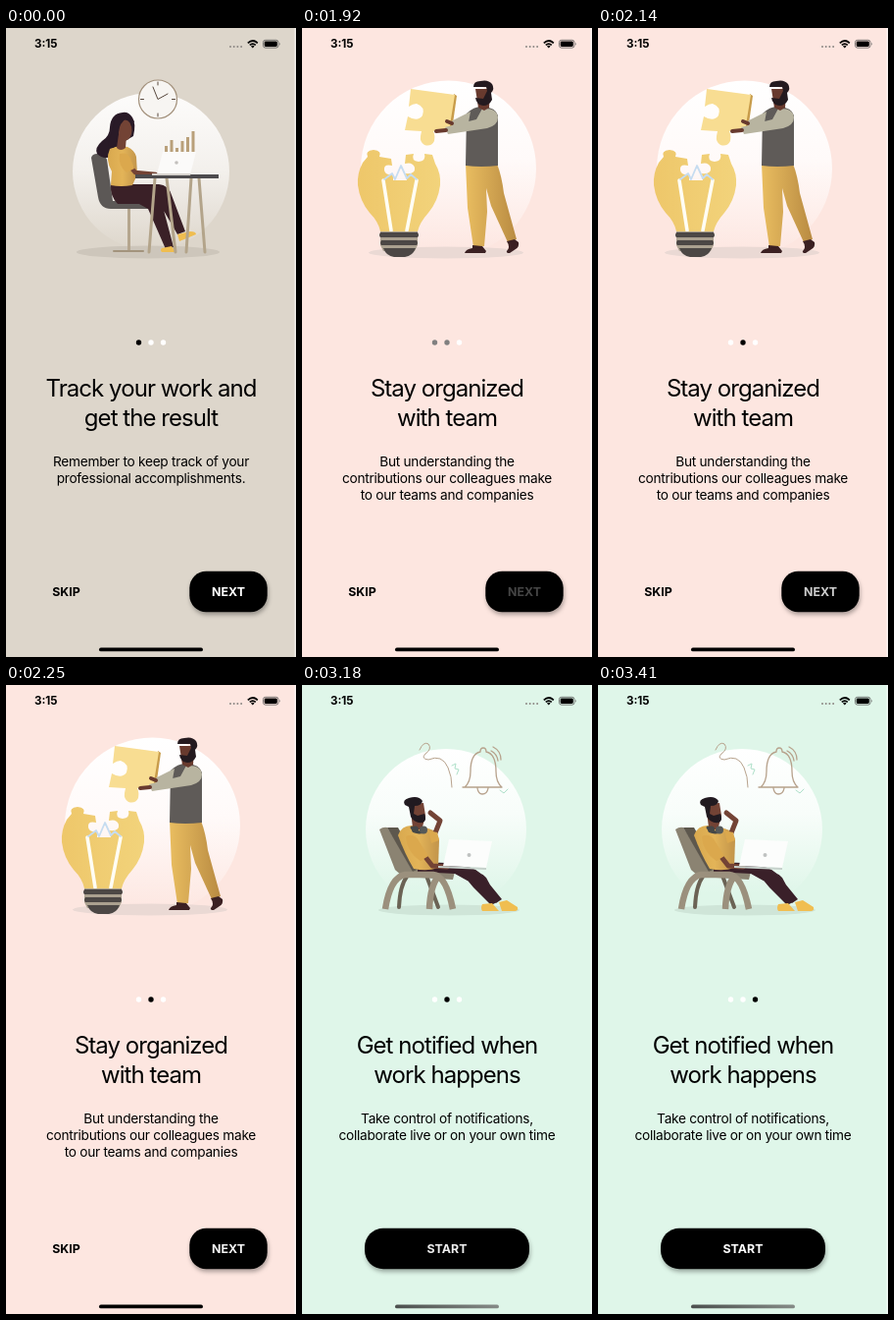
Animation, 296 px wide and 640 px high, one loop 3.45 s. Source, as an HTML page:

```html
<!DOCTYPE html>
<html lang="en">
<head>
<meta charset="utf-8">
<title>Onboarding</title>
<style>
  html, body { margin: 0; width: 100%; height: 100%; overflow: hidden; }
  svg { display: block; width: 100vw; height: 100vh; }
  text { font-family: Inter, "Liberation Sans", sans-serif; font-optical-sizing: none; text-anchor: middle; }
  .title { font-size: 24px; letter-spacing: -.95px; }
  .body { font-size: 13.7px; letter-spacing: -.27px; }
  .btn { font-size: 12.4px; font-weight: 700; }
  .time { font-size: 11.6px; font-weight: 700; }
  .shadow { filter: drop-shadow(1px 3px 2px rgba(0, 0, 0, .3)); }
  .line { fill: none; stroke-linecap: round; stroke-linejoin: round; }
</style>
</head>
<body>
<svg viewBox="0 0 296 640" preserveAspectRatio="none">
  <defs>
    <linearGradient id="disc1" x2="0" y2="1">
      <stop stop-color="#fdfcfb"/><stop offset=".5" stop-color="#f3f0ec"/><stop offset="1" stop-color="#ddd6cb"/>
    </linearGradient>
    <linearGradient id="disc2" x2="0" y2="1">
      <stop stop-color="#fff"/><stop offset=".45" stop-color="#fffaf9"/><stop offset="1" stop-color="#fde6e0"/>
    </linearGradient>
    <linearGradient id="disc3" x2="0" y2="1">
      <stop stop-color="#fff"/><stop offset=".4" stop-color="#f8fdfa"/><stop offset=".9" stop-color="#dff6e9"/>
    </linearGradient>
    <linearGradient id="gold"><stop stop-color="#e9bd60"/><stop offset="1" stop-color="#b98b42"/></linearGradient>
    <linearGradient id="shirt"><stop stop-color="#d9a94f"/><stop offset=".5" stop-color="#e3b458"/><stop offset="1" stop-color="#c2944a"/></linearGradient>
    <linearGradient id="bulb"><stop stop-color="#eec76a"/><stop offset="1" stop-color="#f2d37b"/></linearGradient>
    <linearGradient id="bar"><stop stop-color="#4c504e"/><stop offset="1" stop-color="#858b87"/></linearGradient>
  </defs>

  <rect id="bg" width="296" height="640"/>
  <rect x="294.5" width="1.5" height="640" fill="#fff" opacity=".6"/>

  <g class="page" data-bg="#ddd6cb">
    <circle cx="148" cy="146" r="80" fill="url(#disc1)"/>
    <ellipse cx="145" cy="228" rx="73" ry="6.5" fill="#cdc6bb"/>
    <circle cx="155" cy="72.5" r="19.5" fill="#f7f5f2" stroke="#a3917c" stroke-width="1.2"/>
    <path class="line" stroke="#58483d" d="M150 60 155 72.500 165 67M155 55v3M155 87v3M137.500 72.500h3M169.500 72.500h3"/>
    <path fill="#b9a07a" d="M162 120h3v9h-3zM167.500 114h3v15h-3zM173 122h3v7h-3zM178.500 115h3v12h-3zM184 111h3v16h-3zM189.500 105h3v22h-3z"/>
    <!-- chair -->
    <path class="line" stroke="#b5a68e" stroke-width="3" d="M125.500 184v42"/>
    <path class="line" stroke="#a3947d" stroke-width="2" d="M110 227h30"/>
    <path fill="#5c5856" d="M87 132q1-4 6-4 8-1 10 6l6 42 43 1q3 5-2 7h-43q-11 0-13-12z"/>
    <!-- person -->
    <path fill="#3a2027" d="M107 159h49q10 1 13 11l14 37-8 3-18-31h-43q-8-8-7-20zM134 164q20-2 24 10l13 49-8 2-18-41-11-6z"/>
    <path fill="#efbd50" d="M159 224l10-2 4 6H159q-2-2 0-4zM175 210l13-3q6 0 6 3l-17 7z"/>
    <path fill="#291a27" d="M119 86q-12 1-13 15 0 9-8 14-8 7-5 13 6 6 14 3 10-5 11-14l12-7q3-13-1-19-4-6-10-5z"/>
    <path fill="url(#shirt)" d="M106 123q8-4 18-2 7 3 9 10l1 18-5 11q-12 2-22 0l1-14q-7-12-2-23z"/>
    <path class="line" stroke="#734335" stroke-width="4.500" d="M124 138l8 9 21 2"/>
    <path fill="#dba84d" d="M116 128q8-2 11 5l4 10-8 4q-9-7-7-19z"/>
    <path fill="#734335" d="M115 108l8 1-1 13q-5 4-9 0z"/>
    <ellipse cx="121.500" cy="104" rx="7" ry="10.500" fill="#734335"/>
    <path fill="#291a27" d="M128 100q-1-6-5-8-7 4-8 14l-5 16-6-3 8-28 12-2 7 6z"/>
    <!-- desk -->
    <path class="line" stroke="#b3a48a" stroke-width="3" d="M152 153l-6 75M164 153l9 75M189 153l-5 75M197 153l6 75"/>
    <path fill="#4d4b4e" d="M132 149h85v4h-85z"/>
    <path fill="#fbfaf9" d="M160 126h34l-6 23h-34z"/>
    <path fill="#d6d2cd" d="M149 148h40l-1 2h-39z"/>
    <circle cx="174" cy="137" r="1.800" fill="#c3c0bd"/>

    <text class="title"><tspan x="148" y="375">Track your work and</tspan><tspan x="148" y="405">get the result</tspan></text>
    <text class="body"><tspan x="148" y="446">Remember to keep track of your</tspan><tspan x="148" y="463">professional accomplishments.</tspan></text>
  </g>

  <g class="page" data-bg="#fde6e0">
    <circle cx="149.500" cy="143" r="89.500" fill="url(#disc2)"/>
    <ellipse cx="147" cy="228.500" rx="79" ry="6" fill="#ead9d4"/>
    <!-- bulb -->
    <path fill="url(#bulb)" d="M62 137l5-6q-3-6 6-7 9 1 6 7l12 2 1 7q-9-2-8 5 2 6 9 3v7h14l-1-7q10 1 9-6-2-6-10-4l1-9 8-1q-3 7 5 8 8-1 6-8l8 1 3 9q6 10 5 22-2 16-12 28-9 10-11 19H80q-2-10-11-19-10-12-12-28-1-12 5-23z"/>
    <path class="line" stroke="#fffdf4" stroke-width="3.600" d="M83 155l8 51M117 155l-10 51"/>
    <path class="line" stroke="#c6dcf0" stroke-width="1.800" d="M84 154l8-6 3 6 6-14 6 13 4-4 6 5"/>
    <path fill="#aaa08f" d="M80 207h38v14l-3 6H83l-3-6z"/>
    <path fill="#4c4745" d="M80 208h38q2 3 0 5H80q-2-2 0-5zM81 216h36q2 3 0 5H81q-2-2 0-5zM83 224h33q-3 8-11 9H94q-8-1-11-9z"/>
    <!-- puzzle piece -->
    <path fill="#c89c4b" d="M155 67l3 2-5 35-4 3z"/>
    <path fill="#f8dd92" d="M111 62l45 6-6 37-16 0q2 4 1 10-3 6-10 4-5-3-4-9l1-5-17-1 3-14q10 6 15-1 3-9-6-12-4 0-8 3z"/>
    <!-- person -->
    <path fill="url(#gold)" d="M167 138h32q5 13 7 30l13 47-9 3-17-37-5-18 1 24-3 35-11 1-6-40z"/>
    <path fill="#3b2022" d="M174 221l10 1 4 5-1 2h-21q1-4 8-5zM209 217l8-2 4 3q1 5-3 7l-6 4q-4 0-3-2 4-4 0-10z"/>
    <path fill="#5f5b58" d="M168 87q8-8 17-7 13 1 15 9v51q-17 2-33 0z"/>
    <path fill="#b8b4a0" d="M184 82q15-1 16 9 0 8-11 11l-40 6-3-7 32-8zM152 95l20-10-2 11-16 4z"/>
    <path class="line" stroke="#683a2e" stroke-width="4" d="M147 104l-10 1M153 97l-5-2"/>
    <path fill="#683a2e" d="M177 62h15l-1 19-5 3-6-3z"/>
    <path fill="#241a1f" d="M175 60q0-6 7-6 8-2 12 3 3 5-1 9l1 7q-3 6-9 6-7-1-8-8l8 1 4-8-1-4z"/>

    <text class="title"><tspan x="148" y="375">Stay organized</tspan><tspan x="148" y="405">with team</tspan></text>
    <text class="body"><tspan x="148" y="446">But understanding the</tspan><tspan x="148" y="463">contributions our colleagues make</tspan><tspan x="148" y="480">to our teams and companies</tspan></text>
  </g>

  <g class="page" data-bg="#dff6e9">
    <circle cx="147" cy="147" r="82" fill="url(#disc3)"/>
    <ellipse cx="150" cy="229" rx="72" ry="5.500" fill="#cfe5d8"/>
    <!-- bell and trails -->
    <g class="line" stroke="#b7a28c" stroke-width="1.300">
      <path d="M166 104q6-5 6-16 0-18 10-20 0-4 3-4t3 4q10 2 10 20 0 11 6 16zM179 105q1 6 5 6 5 0 6-6M164 104h40M193 67q6 3 7 10M195 63q8 4 8 13"/>
      <path stroke-width="1" d="M120 66q4-9 9-6 4 5-3 10-5 5 3 6 14-6 20 8 4 9 4 20"/>
    </g>
    <path class="line" stroke="#aee0c9" d="M153 82l4-2-1 5 4 1-2 5M202 107l4 3 4-4"/>
    <!-- chair -->
    <path class="line" stroke="#6b6355" stroke-width="4" d="M99 226q1-22 8-31M127 194l12 32"/>
    <path fill="#8b8372" d="M79 147q4-3 8-2l27 42 42 3-2 8-51-3-8-7z"/>
    <path fill="#5d574d" d="M87 145h11l23 41-8 4z"/>
    <!-- person -->
    <path fill="#3a2029" d="M118 183q26-5 47 1 14 2 21 12l18 22-6 4-24-20-18-10-38-2zM160 188q20-1 28 8l13 24-8 4-18-18z"/>
    <path fill="#f0be51" d="M184 223l10-1 7 8h-17q-2-3 0-7zM201 221l8-2 11 7q1 4-3 4h-13z"/>
    <path fill="url(#shirt)" d="M98 153q4-11 15-10l16 3q9 2 11 12l-1 28q-11 4-25 1-9-15-16-34z"/>
    <path class="line" stroke="#734335" stroke-width="5" d="M135 153l6-15-10-8M122 170l11 14 15 1"/>
    <path fill="#dba84d" d="M106 154q9-4 14 6l9 14-8 5q-14-9-15-25zM129 148l9 2 2 8-8 3z"/>
    <path fill="#734335" d="M110 121l14-1 2 13-4 15-9-3z"/>
    <path fill="#211a20" d="M105 122q-3-5 4-7 10-3 14 3-1 5-8 5l-1 8 4 2 7-2q3 7-2 9-8 1-12-6l-2-10z"/>
    <path class="line" stroke="#454747" stroke-width="3" d="M112 145q4 7 12 4"/>
    <circle cx="115.500" cy="147" r="3.500" fill="#454747"/>
    <circle cx="124" cy="147.500" r="4" fill="#565958"/>
    <!-- armrest and legs -->
    <path fill="none" stroke="#9b907d" stroke-width="6.500" d="M85 228q5-32 20-35h29q13 1 20 35M130 228q1-24 9-33"/>
    <path fill="#fcfdfc" d="M150 157l44 2-6 27-44-2z"/>
    <path fill="#c6d1cb" d="M139 184l49 2v2l-49-2z"/>
    <circle cx="170.500" cy="173" r="2" fill="#bfc2c1"/>

    <text class="title"><tspan x="148" y="375">Get notified when</tspan><tspan x="148" y="405">work happens</tspan></text>
    <text class="body"><tspan x="148" y="446">Take control of notifications,</tspan><tspan x="148" y="463">collaborate live or on your own time</tspan></text>
  </g>

  <!-- status bar -->
  <text class="time" x="40.800" y="20.300">3:15</text>
  <g fill="#8d8885"><circle cx="229" cy="19" r="1"/><circle cx="232.700" cy="19" r="1"/><circle cx="236.400" cy="19" r="1"/><circle cx="240.100" cy="19" r="1"/></g>
  <path fill="none" stroke="#000" stroke-width="1.700" d="M246.800 15.300q5-4.600 10 0M248.800 17.400q3-2.700 6 0"/>
  <path d="M250 18.400q1.800-1.400 3.600 0l-1.800 2z"/>
  <rect x="262.500" y="12.300" width="15.500" height="7.800" rx="2.300" fill="none" stroke="#555" stroke-width=".8"/>
  <rect x="263.700" y="13.500" width="13.100" height="5.400" rx="1.300"/>
  <path fill="#777" d="M279 14.700q1.600 1.500 0 3z"/>

  <g id="dots"><circle cx="135.500" cy="320" r="2.700"/><circle cx="148" cy="320" r="2.700"/><circle cx="160.500" cy="320" r="2.700"/></g>

  <text id="skip" class="btn" x="61.500" y="578.300">SKIP</text>
  <rect id="button" class="shadow" y="552.800" height="41.400"/>
  <text id="label" class="btn" y="578.300" fill="#fff"></text>
  <rect id="home" x="95" y="630.500" width="106" height="3.800" rx="1.900"/>
</svg>
<script>
const LOOP = 3450;
// start ms, page, dot position, label opacity
const steps = [
  [0, 0, 0, 1],
  [1810, 1, 0, .17],
  [1920, 1, .5, .27],
  [2030, 1, 1, .45],
  [2140, 1, 1, .8],
  [2250, 1, 1, .95],
  [2350, 1, 1, 1],
  [3180, 2, 1, .93],
  [3300, 2, 1.5, .96],
  [3410, 2, 2, 1]
];
const $ = id => document.getElementById(id);
const pages = [...document.querySelectorAll('.page')];
const dots = [...$('dots').children];
const set = (el, attrs) => Object.entries(attrs).forEach(([k, v]) => el.setAttribute(k, v));

function draw(t) {
  const [, page, pos, alpha] = steps.findLast(s => s[0] <= t);
  const last = page === 2;
  pages.forEach((p, i) => set(p, { display: i === page ? 'inline' : 'none' }));
  set($('bg'), { fill: pages[page].dataset.bg });
  dots.forEach((d, i) => {
    const c = 255 * Math.min(1, Math.abs(i - pos));
    set(d, { fill: `rgb(${c},${c},${c})` });
  });
  set($('skip'), { display: last ? 'none' : 'inline' });
  set($('button'), last ? { x: 64, width: 168, rx: 19 } : { x: 187.3, width: 79.4, rx: 17 });
  set($('label'), { x: last ? 148 : 227, 'fill-opacity': alpha });
  $('label').textContent = last ? 'START' : 'NEXT';
  set($('home'), { fill: last ? 'url(#bar)' : '#000' });
}

function tick(now) {
  draw(now % LOOP);
  requestAnimationFrame(tick);
}
draw(0);
requestAnimationFrame(tick);
</script>
</body>
</html>
```
